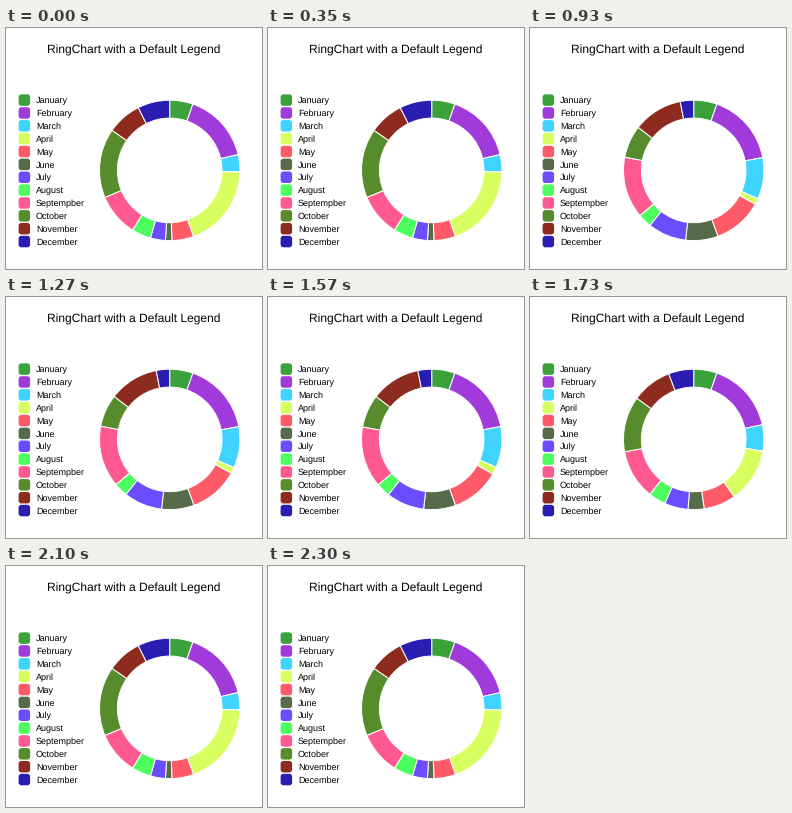
These frames come from a looping animation (256 px wide and 241 px high, 2330 ms). A matplotlib script:

```python
import matplotlib.pyplot as plt
import numpy as np
from matplotlib.animation import FuncAnimation
from matplotlib.patches import FancyBboxPatch, Wedge

W, H, DPI = 256, 241, 100
LOOP, TICK = 2330, 10      # ms
STEP = 100 / 3             # ms between visible poses
DURATION = 350             # ms per transition
OUT_START, BACK_START = 437, 1532

MONTHS = [
    ("January", "#3ba13b"), ("February", "#a03adb"), ("March", "#3ed4ff"),
    ("April", "#d8ff60"), ("May", "#ff5a68"), ("June", "#566b4a"),
    ("July", "#6b4cff"), ("August", "#4cff5f"), ("Septempber", "#ff5a90"),
    ("October", "#578c2c"), ("November", "#8c2b1e"), ("December", "#2a1db2"),
]

# Slice borders in degrees, clockwise from the top.
FIRST = np.array([0, 19.3, 77, 91.3, 160.2, 178.2, 183.5, 195.9, 211.9, 247.4,
                  304.8, 333.4, 360])
SECOND = np.array([0, 19.3, 79.5, 113.8, 118.8, 159.8, 186.7, 218.5, 230,
                   280.9, 307.8, 348.9, 360])

CENTER, RADIUS, THICKNESS = (163.7, 142.4), 70.2, 17.9

# Ease-in-out Bezier curve with control points (.42, 0) and (.58, 1).
s = np.linspace(0, 1, 201)
EASE_X = 1.26 * s * (1 - s) ** 2 + 1.74 * s ** 2 * (1 - s) + s ** 3
EASE_Y = 3 * s ** 2 - 2 * s ** 3


def px(size):
    return size * 72 / DPI


def ease(ms, start):
    return np.interp((ms - start) / DURATION, EASE_X, EASE_Y)


def label(x, y, text, size):
    ax.text(x, y, text, fontsize=px(size), family="Liberation Sans",
            color="black", ha="left", va="baseline")


plt.rcParams["text.hinting"] = "none"
plt.rcParams["text.hinting_factor"] = 1
fig = plt.figure(figsize=(W / DPI, H / DPI), dpi=DPI, facecolor="white")
ax = fig.add_axes([0, 0, 1, 1])
ax.set_xlim(0, W)
ax.set_ylim(H, 0)
ax.axis("off")

label(41.4, 25.4, "RingChart with a Default Legend", 12.38)
ax.plot([0, W], [H - 0.5, H - 0.5], color="#b8b8b8", lw=px(1))

slices = []
for i, (name, color) in enumerate(MONTHS):
    y = 72.1 + 12.86 * i
    ax.add_patch(FancyBboxPatch(
        (12.6, y - 5.75), 11.5, 11.5, fc=color, ec="none",
        boxstyle="round,pad=0,rounding_size=2.8"))
    label(29.9, y + 3.2, name, 9.05)
    wedge = Wedge(CENTER, RADIUS, 0, 1, width=THICKNESS, fc=color,
                  ec="white", lw=px(1))
    slices.append(ax.add_patch(wedge))


def update(i):
    ms = int((i * TICK + 5) / STEP) * STEP
    mix = ease(ms, OUT_START) - ease(ms, BACK_START)
    borders = FIRST + (SECOND - FIRST) * mix - 90
    for wedge, start, end in zip(slices, borders, borders[1:]):
        wedge.set_theta1(start)
        wedge.set_theta2(end)
    return slices


anim = FuncAnimation(fig, update, frames=LOOP // TICK, interval=TICK,
                     repeat=True, repeat_delay=0)
plt.show()
```
